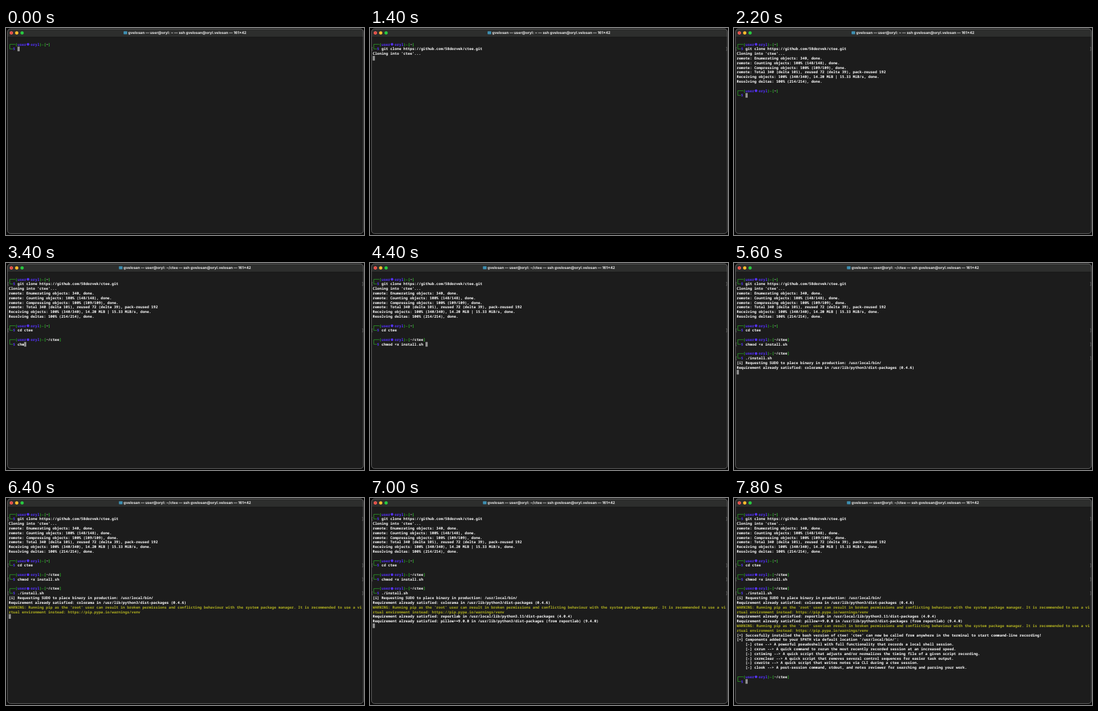
An HTML page that plays this animation: 600 by 348 pixels, repeating every 8000 ms.

```html
<!DOCTYPE html>
<html lang="en">
<head>
<meta charset="utf-8">
<title>Terminal session</title>
<style>
  html, body { margin: 0; width: 100%; height: 100%; overflow: hidden; background: #0b0b0b; }
  svg { display: block; width: 100vw; height: 100vh; }
  text { white-space: pre; text-rendering: geometricPrecision; }
  #screen text { font: 600 6.145px "Noto Sans Mono", monospace; fill: #fff; }
  #screen .user { fill: #5533ff; font-weight: 800; }
  #screen .green { fill: #2fc02a; }
  #screen .path { font-weight: 800; }
  #screen .warn { fill: #b0b020; }
  #title { font: 700 6.15px Inter, sans-serif; fill: #ececec; }
  .rule { fill: none; stroke: #2fb52a; stroke-width: .75; }
  .mark { fill: none; stroke: #7c7c7c; stroke-width: .6; }
</style>
</head>
<body>
<svg viewBox="0 0 600 348" preserveAspectRatio="none">
  <rect x="2.5" y="1.5" width="596.5" height="344" rx="5" fill="#1c1c1c"/>
  <path d="M2.5 15V6.5a5 5 0 0 1 5-5H594a5 5 0 0 1 5 5V15z" fill="#2d2e2d"/>
  <path d="M2.5 15.2H599" stroke="#111" stroke-width=".6"/>
  <rect x="2.5" y="1.5" width="596.5" height="344" rx="5" fill="none" stroke="#7b7b7b" stroke-width=".8"/>
  <circle cx="9" cy="8.2" r="2.7" fill="#fe5f57"/>
  <circle cx="9" cy="8.2" r=".8" fill="#7a1512"/>
  <circle cx="18" cy="8.2" r="2.7" fill="#febc2e"/>
  <circle cx="27" cy="8.2" r="2.7" fill="#28c840"/>
  <rect id="folder" y="5.4" width="6" height="5.2" rx=".8" fill="#3d8eb0"/>
  <text id="title" y="10.2"></text>
  <g id="screen"></g>
</svg>
<script>
const LOOP = 8000, CELL = 3.687, LINE = 7.806, LEFT = 4.5, TOP = 27.4;
const USER = "user", HOST = "oryl";
const screen = document.getElementById("screen");
const title = document.getElementById("title");
const folder = document.getElementById("folder");
const updates = [], cursorSteps = [];

const colX = col => LEFT + col * CELL;
const rowY = row => TOP + row * LINE;
const valueAt = (steps, t) => steps.findLast(step => step[0] <= t);

function add(tag, attrs, parent = screen) {
  const el = document.createElementNS("http://www.w3.org/2000/svg", tag);
  for (const key in attrs) el.setAttribute(key, attrs[key]);
  return parent.appendChild(el);
}

function showFrom(el, time) {
  updates.push(t => el.style.display = t >= time ? "" : "none");
  return el;
}

function put(row, col, text, cls = "", parent = screen) {
  const el = add("text", { x: colX(col), y: rowY(row) + 2.2, class: cls }, parent);
  el.textContent = text;
  return el;
}

function prompt(time, row, path) {
  const g = showFrom(add("g", {}), time);
  const y = rowY(row), x = colX(.5);
  add("path", { class: "rule", d: `M${colX(3)} ${y}H${x}V${y + LINE}H${colX(2)}` }, g);
  put(row, 3, "(", "green", g);
  put(row, 4, USER, "user", g);
  add("circle", { cx: colX(8.8), cy: y, r: 2.2, fill: "#5533ff" }, g);
  put(row, 10, HOST, "user", g);
  put(row, 14, ")-[", "green", g);
  put(row, 17, path, "path", g);
  put(row, 17 + path.length, "]", "green", g);
  put(row + 1, 2, "$", "user", g);
  cursorSteps.push([time, row + 1, 4]);
}

// Typed text grows in steps; entering it adds the line brackets.
function command(row, steps, entered) {
  const el = put(row, 4, "");
  updates.push(t => el.textContent = valueAt(steps, t)?.[1] ?? "");
  for (const [time, text] of steps) cursorSteps.push([time, row, 4 + text.length]);
  const y = rowY(row) - 2.7;
  showFrom(add("path", { class: "mark", d: `M4.6 ${y}h-1.3v5.4h1.3M596.8 ${y}h1.3v5.4h-1.3` }), entered);
  cursorSteps.push([entered, row + 1, 0]);
}

function output(time, row, lines, cls) {
  lines.forEach((line, i) => showFrom(put(row + i, 0, line, cls), time));
  cursorSteps.push([time, row + lines.length, 0]);
}

const warning = [
  "WARNING: Running pip as the 'root' user can result in broken permissions and conflicting behaviour with the system package manager. It is recommended to use a vi",
  "rtual environment instead: https://pip.pypa.io/warnings/venv"
];

prompt(0, 0, "~");
command(1, [
  [200, "gi"], [400, "git c"], [600, "git clon"], [800, "git clone "],
  [1000, "git clone https://github.com/58dorvek/ctee.git"]
], 1200);
output(1200, 2, ["Cloning into 'ctee'..."]);
output(1600, 3, [
  "remote: Enumerating objects: 340, done.",
  "remote: Counting objects: 100% (148/148), done.",
  "remote: Compressing objects: 100% (109/109), done."
]);
output(1800, 6, ["remote: Total 340 (delta 101), reused 72 (delta 39), pack-reused 192"]);
const receiving = put(7, 0, "");
const receivingSteps = [
  [1800, "Receiving objects:  38% (130/340)"],
  [2000, "Receiving objects:  79% (269/340), 7.10 MiB | 14.18 MiB/s"],
  [2200, "Receiving objects: 100% (340/340), 14.20 MiB | 15.33 MiB/s, done."]
];
updates.push(t => receiving.textContent = valueAt(receivingSteps, t)?.[1] ?? "");
output(2200, 8, ["Resolving deltas: 100% (214/214), done."]);

prompt(2200, 10, "~");
command(11, [[2400, "cd"], [2600, "cd ct"], [2800, "cd ctee"]], 3000);
prompt(3000, 13, "~/ctee");
command(14, [
  [3400, "chm"], [3600, "chmod "], [3800, "chmod +x"], [4000, "chmod +x in"],
  [4200, "chmod +x inst"], [4400, "chmod +x install.sh "]
], 4600);
prompt(4600, 16, "~/ctee");
command(17, [[4800, "./"], [5000, "./ins"], [5200, "./install.sh "]], 5400);
output(5400, 18, ["[i] Requesting SUDO to place binary in production: /usr/local/bin/"]);
output(5600, 19, ["Requirement already satisfied: colorama in /usr/lib/python3/dist-packages (0.4.6)"]);
output(6400, 20, warning, "warn");
output(6800, 22, ["Requirement already satisfied: reportlab in /usr/local/lib/python3.11/dist-packages (4.0.4)"]);
output(7000, 23, ["Requirement already satisfied: pillow>=9.0.0 in /usr/lib/python3/dist-packages (from reportlab) (9.4.0)"]);
output(7600, 24, warning, "warn");
output(7800, 26, [
  "[+] Succesfully installed the bash version of ctee! 'ctee' can now be called from anywhere in the terminal to start command-line recording!",
  "[+] Components added to your $PATH via default location '/usr/local/bin/':",
  "    [-] ctee --> A powerful pseudoshell with full functionality that records a local shell session.",
  "    [-] cxrun --> A quick command to rerun the most recently recorded session at an increased speed.",
  "    [-] cxtiming --> A quick script that adjusts and/or normalizes the timing file of a given script recording.",
  "    [-] cxrmclear --> A quick script that removes several control sequences for easier task output.",
  "    [-] cxwrite --> A quick script that writes notes via CLI during a ctee session.",
  "    [-] clook --> A post-session command, stdout, and notes reviewer for searching and parsing your work."
]);
prompt(7800, 35, "~/ctee");

const cursor = add("rect", { width: CELL, height: LINE, fill: "#929292" });
updates.push(t => {
  const [, row, col] = valueAt(cursorSteps, t);
  cursor.setAttribute("x", colX(col));
  cursor.setAttribute("y", rowY(row) - LINE / 2);
});

const titleSteps = [[0, "~"], [3000, "~/ctee"]];
updates.push(t => {
  const path = valueAt(titleSteps, t)[1];
  title.textContent = `gvelosan — ${USER}@${HOST}: ${path} — ssh gvelosan@${HOST}.velosan — 161×42`;
  const start = 300 - (title.getComputedTextLength() + 7.8) / 2;
  folder.setAttribute("x", start);
  title.setAttribute("x", start + 7.8);
});

function draw() {
  const t = performance.now() % LOOP;
  for (const update of updates) update(t);
  requestAnimationFrame(draw);
}
draw();
</script>
</body>
</html>
```
